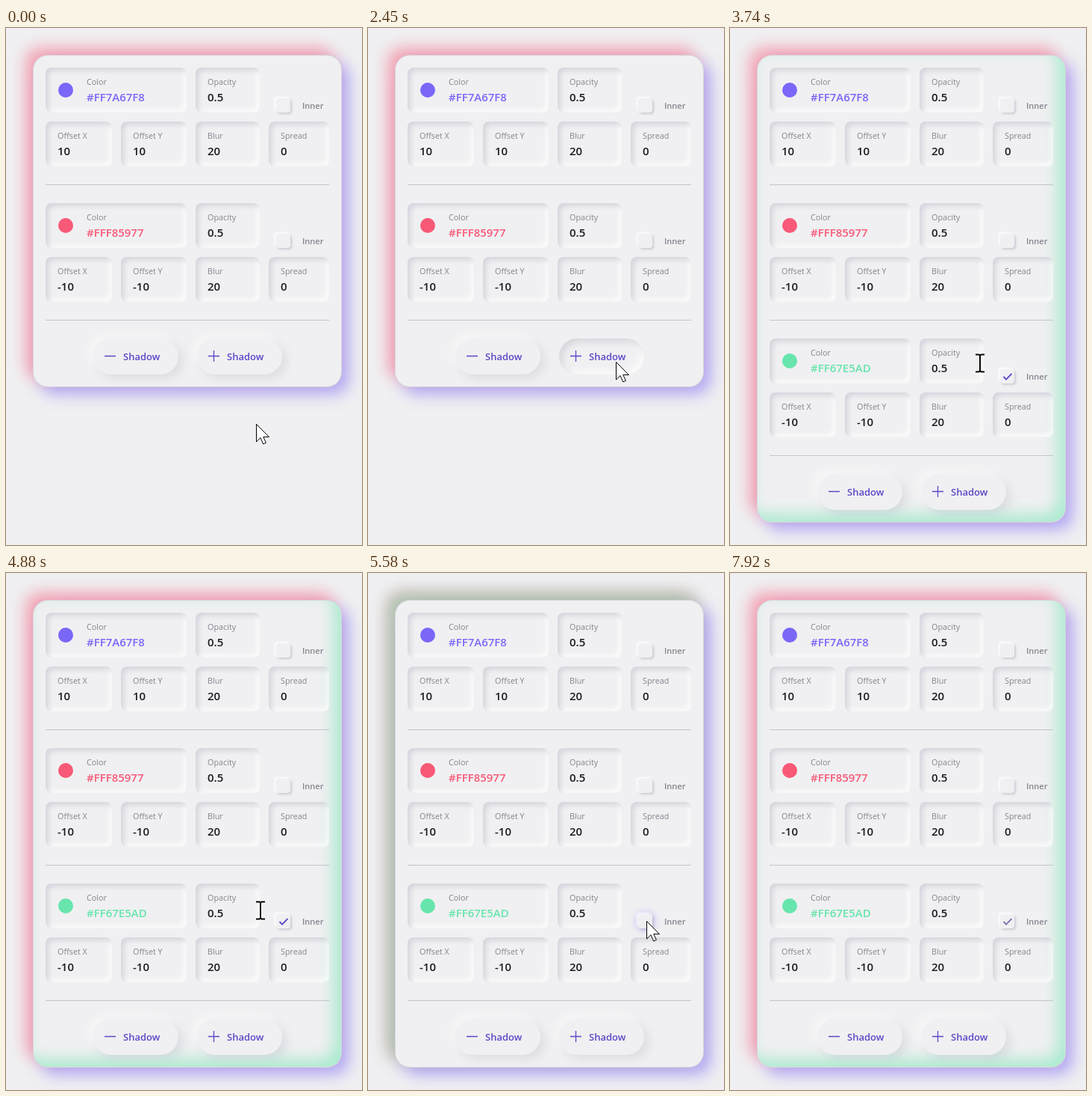
Animation, 477 px wide and 691 px high, one loop 9160 ms. Source, as an HTML page:

```html
<!DOCTYPE html>
<html lang="en">
<head>
<meta charset="utf-8">
<title>Shadow editor</title>
<style>
html, body { margin: 0; width: 100%; height: 100%; overflow: hidden; background: #f0f0f2; }
#stage { position: absolute; left: 0; top: 0; width: 477px; height: 691px; overflow: hidden; background: #f0f0f2; }
#stage div { position: absolute; box-sizing: border-box; }
#panel { left: 36px; top: 36px; width: 414px; border-radius: 20px; background: #f0f0f2; border: 1px solid rgba(130, 130, 145, .22); }
.field { border-radius: 8px; box-shadow: inset 4px 4px 6px rgba(166, 166, 186, .36), inset -4px -4px 6px rgba(255, 255, 255, .72); }
.box { border-radius: 4px; background: #f0f0f2; box-shadow: 2px 2px 3px rgba(160, 160, 178, .45), -2px -2px 3px rgba(255, 255, 255, .85); }
.glow { border-radius: 8px; box-shadow: 0 0 9px 4px rgba(122, 103, 248, .26); }
.button { border-radius: 24px; background: #f0f0f2; box-shadow: 6px 6px 12px rgba(166, 166, 186, .25), -6px -6px 14px rgba(255, 255, 255, .45); }
.button.down { box-shadow: inset 5px 5px 9px rgba(166, 166, 186, .34), inset -5px -5px 9px rgba(255, 255, 255, .75); }
svg { position: absolute; left: 0; top: 0; }
text { font-family: "Open Sans", "Noto Sans", sans-serif; }
.label { font-size: 10.8px; font-weight: 500; fill: #85838f; }
.inner { font-size: 11px; font-weight: 600; fill: #85838f; }
.value { font-size: 15px; font-weight: 600; fill: #1c1b22; }
.action { font-size: 13px; font-weight: 600; fill: #5b48c6; }
.icon { fill: none; stroke: #5b48c6; stroke-width: 1.3; }
</style>
</head>
<body>
<div id="stage"></div>
<script>
const LOOP = 9160, PITCH = 181;
const PRESS = 2450, ADD = 3430, UNCHECK = 5580, RECHECK = 7240;
const stage = document.getElementById("stage");

function div(cls, x, y, w, h, parent = stage) {
  const el = document.createElement("div");
  el.className = cls;
  Object.assign(el.style, { left: x + "px", top: y + "px", width: w + "px", height: h + "px" });
  parent.appendChild(el);
  return el;
}

function node(parent, tag, attrs, content) {
  const el = document.createElementNS("http://www.w3.org/2000/svg", tag);
  for (const k in attrs) el.setAttribute(k, attrs[k]);
  if (content) el.textContent = content;
  parent.appendChild(el);
  return el;
}

const panel = div("", 36, 36, 414, 444);
panel.id = "panel";
const boxes = div("", 0, 0, 477, 691);
const svg = node(stage, "svg", { width: 477, height: 691 });

function group(index, color, code, offset) {
  const dy = index * PITCH;
  const layer = div("", 0, dy, 477, 180, boxes);
  const g = node(svg, "g", { transform: `translate(0 ${dy})` });
  const values = [], labels = [];
  const cells = [
    [53, 53, 189, 55, "Color", code],
    [254, 53, 86, 16, "Opacity", "0.5"],
    [53, 125, 89, 16, "Offset X", offset],
    [154, 125, 88, 16, "Offset Y", offset],
    [254, 125, 86, 16, "Blur", "20"],
    [352, 125, 81, 16, "Spread", "0"]
  ];
  for (const [x, y, w, pad, name, value] of cells) {
    div("field", x, y, w, 60, layer);
    const v = node(g, "text", { class: "value", x: x + pad }, value);
    if (name === "Color") v.style.fill = color;
    values.push([v, y]);
    labels.push([node(g, "text", { class: "label", x: x + pad }, name), y]);
  }
  const glow = div("glow", 362, 94, 19, 19, layer);
  div("box", 362, 94, 19, 19, layer);
  node(g, "circle", { cx: 80, cy: 83, r: 10, fill: color });
  node(g, "text", { class: "inner", x: 397, y: 108 }, "Inner");
  node(g, "path", { d: "M53 209.5H433", stroke: "#c4c4ca" });
  const tick = node(g, "path", { d: "M366.5 104l3.5 3.6 7.5-7.6", fill: "none", "stroke-width": 1.8 });

  // k = 0: label fills the field, k = 1: label sits above the value
  function float(k) {
    for (const [el, y] of values) {
      el.setAttribute("y", y + 37 + 8 * k);
      el.setAttribute("opacity", .8 + .2 * k);
    }
    for (const [el, y] of labels) {
      el.setAttribute("y", y + 35 - 12 * k);
      el.style.fontSize = 15.8 - 5 * k + "px";
    }
  }
  float(1);
  tick.style.display = "none";
  glow.style.opacity = 0;
  return { layer, g, tick, glow, float };
}

group(0, "#7a67f8", "#FF7A67F8", "10");
group(1, "#f85977", "#FFF85977", "-10");
const third = group(2, "#67e5ad", "#FF67E5AD", "-10");

const buttonLayer = div("", 0, 0, 477, 691);
stage.insertBefore(buttonLayer, svg);
div("button", 117, 415, 114, 48, buttonLayer);
const plus = div("button", 256, 415, 114, 48, buttonLayer);
const actions = node(svg, "g", {});
node(actions, "path", { class: "icon", d: "M132 438.5h15M271 438.5h15M278.5 431v15" });
for (const x of [157, 296]) node(actions, "text", { class: "action", x, y: 444 }, "Shadow");

const arrow = node(svg, "path", {
  d: "M.5 .5V24L6 18.7 9.7 27 13.4 25.4 9.8 17.6H17.4Z",
  fill: "#fff", stroke: "#000", "stroke-width": 1
});
const beam = node(svg, "g", {});
for (const [stroke, width] of [["#fff", 4], ["#000", 2]])
  node(beam, "path", { d: "M-6-11.5H-1.5L0-10.5 1.5-11.5H6M0-10.5V10.5M-6 11.5H-1.5L0 10.5 1.5 11.5H6", fill: "none", stroke, "stroke-width": width });

const part = (t, a, b) => Math.min(1, Math.max(0, (t - a) / (b - a)));
const smooth = k => k * k * (3 - 2 * k);
const easeOut = k => 1 - (1 - k) ** 2;
const mix = (a, b, k) => a + (b - a) * k;
const show = (el, on) => { el.style.display = on ? "" : "none"; };

// time, x, y of the pointer's resting points
const path = [
  [0, 335, 529], [719, 335, 529], [720, 335, 531], [960, 335, 531],
  [1710, 332, 446], [4770, 332, 446], [5250, 373, 465], [7670, 373, 465], [7920, 478, 470]
];

function pointer(t) {
  for (let i = 1; i < path.length; i++) {
    const [t0, x0, y0] = path[i - 1], [t1, x1, y1] = path[i];
    if (t < t1) {
      const k = smooth(part(t, t0, t1));
      return [mix(x0, x1, k), mix(y0, y1, k)];
    }
  }
  return [478, 470];
}

function render(t) {
  const added = t >= ADD;
  const checked = t < UNCHECK || t >= RECHECK;
  const drop = added ? PITCH : 0;

  const shadows = ["-10px -10px 20px rgba(248,89,119,.5)", "10px 10px 20px rgba(122,103,248,.5)"];
  if (added) shadows.unshift((checked ? "inset " : "") + "-10px -10px 20px rgba(103,229,173,.5)");
  panel.style.height = 444 + drop + "px";
  panel.style.boxShadow = shadows.join(",");

  show(third.layer, added);
  show(third.g, added);
  third.float(easeOut(part(t, ADD, 3740)));
  const hover = t < RECHECK ? part(t, 5090, 5250) : 0;
  third.glow.style.opacity = hover;
  show(third.tick, checked);
  third.tick.setAttribute("stroke", t >= RECHECK ? "#7d75ad" : t >= 5440 ? "#5c596c" : "#5b48c6");

  buttonLayer.style.top = drop + "px";
  actions.setAttribute("transform", `translate(0 ${drop})`);
  plus.classList.toggle("down", t >= PRESS && !added);

  const [x, y] = pointer(t);
  const typing = t >= 3520 && x < 340;
  show(arrow, !typing && t < 7920);
  show(beam, typing);
  arrow.setAttribute("transform", `translate(${Math.round(x)} ${Math.round(y)})`);
  beam.setAttribute("transform", `translate(${Math.round(x) + 3} ${Math.round(y) + 2})`);
}

const start = performance.now();
function tick() {
  render((performance.now() - start) % LOOP);
  requestAnimationFrame(tick);
}
tick();
</script>
</body>
</html>
```
